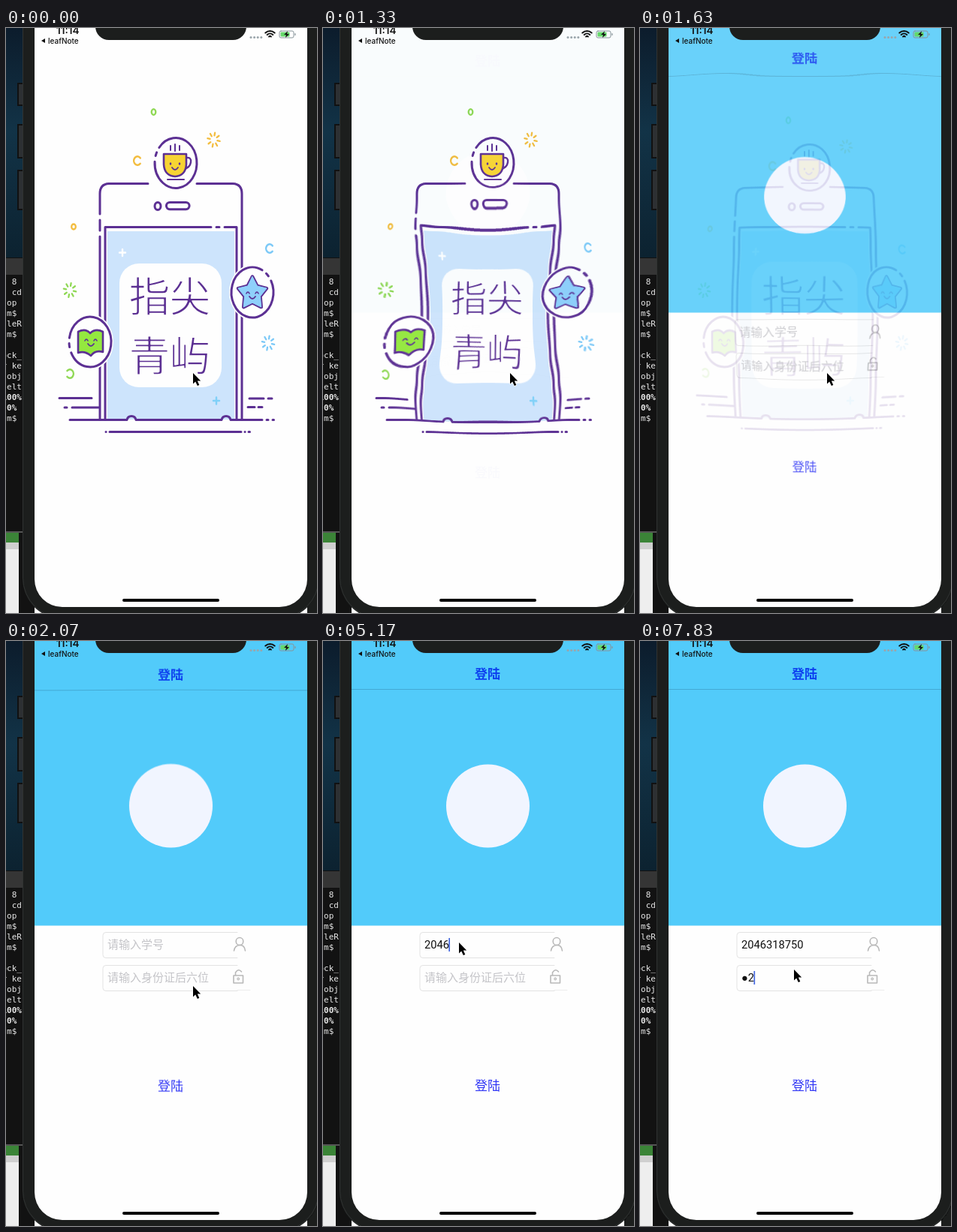
Write an HTML page with a canvas that moves like this. It is 414 px wide and 780 px high and loops after 8 s.

```html
<!DOCTYPE html>
<html lang="zh">
<head>
<meta charset="utf-8">
<style>
html, body { margin: 0; width: 100%; height: 100%; overflow: hidden; background: #1c1e1d; }
canvas { display: block; }
</style>
</head>
<body>
<canvas id="stage" width="414" height="780"></canvas>
<script>
const LOOP = 8000, STEP = 147.7;
const LEFT = 38, WIDTH = 363, HEIGHT = 780, CX = 219, CY = 379;
const PURPLE = '#5c3093', BLUE = '#7cc9f7', GREEN = '#8fd854', GOLD = '#f3bd3f';
const CJK = '"Noto Sans CJK SC", "Noto Sans CJK", sans-serif';
const stage = document.getElementById('stage').getContext('2d', { willReadFrequently: true });
let g = stage;

function line(d, color = PURPLE, width = 3, fill) {
  const path = new Path2D(d);
  if (fill) { g.fillStyle = fill; g.fill(path); }
  g.strokeStyle = color;
  g.lineWidth = width;
  g.lineCap = g.lineJoin = 'round';
  if (width) g.stroke(path);
}

function rect(x, y, w, h, color, radius = 0) {
  g.fillStyle = color;
  g.beginPath();
  g.roundRect(x, y, w, h, radius);
  g.fill();
}

function oval(x, y, rx, ry, color, width, fill, from = 0, to = 7) {
  g.beginPath();
  g.ellipse(x, y, rx, ry, 0, from, Math.min(to, from + Math.PI * 2));
  if (fill) { g.fillStyle = fill; g.fill(); }
  g.strokeStyle = color;
  g.lineWidth = width;
  g.lineCap = 'round';
  if (width) g.stroke();
}

function text(str, x, y, font, color, align = 'left') {
  g.font = font;
  g.fillStyle = color;
  g.textAlign = align;
  g.fillText(str, x, y);
}

// Piecewise interpolation through [position, value] pairs.
function keyed(keys, x, ease = p => p) {
  if (x <= keys[0][0]) return keys[0][1];
  for (let i = 1; i < keys.length; i++) {
    const [x0, y0] = keys[i - 1], [x1, y1] = keys[i];
    if (x < x1) return y0 + (y1 - y0) * ease((x - x0) / (x1 - x0));
  }
  return keys.at(-1)[1];
}

function layer(paint) {
  const canvas = document.createElement('canvas');
  canvas.width = 414;
  canvas.height = HEIGHT;
  g = canvas.getContext('2d');
  paint();
  g = stage;
  return canvas;
}

function burst(x, y, color) {
  for (let i = 0; i < 8; i++) {
    const a = i * Math.PI / 4 + .2, c = Math.cos(a), s = Math.sin(a) * 1.15;
    line(`M${x + c * 5} ${y + s * 5}L${x + c * 8.3} ${y + s * 8.3}`, color, 2.3);
  }
}

function face(x, y, winks) {
  for (const dx of [-6, 6]) {
    if (winks) line(`M${x + dx - 2} ${y}q2 -4 4 0`, PURPLE, 1.6);
    else oval(x + dx, y - 1, 1.3, 1.8, PURPLE, 0, PURPLE);
  }
  line(`M${x - 4} ${y + 4}q4 6 8 0`, PURPLE, 1.8);
}

function badge(x, y, gap) {
  oval(x, y, 31, 37, '#fefefe', 0, '#fefefe');
  oval(x, y, 28, 33.5, PURPLE, 3, null, gap + .5, gap + 6.18);
  oval(x, y, 28, 33.5, PURPLE, 3, null, gap + .13, gap + .28);
}

// Hairline lettering: the fill is trimmed by an outline in the paper colour.
function thinText(char, x, y) {
  text(char, x, y, `200 55px ${CJK}`, PURPLE, 'center');
  g.strokeStyle = '#fefefe';
  g.lineWidth = 1.5;
  g.strokeText(char, x, y);
}

const welcome = layer(() => {
  rect(0, 0, 414, HEIGHT, '#fefefe');
  rect(135, 271, 169, 251, '#cde4fc');
  line('M125 522V278M125 270V256M125 248V221Q125 208 137 207.5H189M254 207.5H302Q314 208 314 221V522');
  line('M132 522V265.5H273M280 265.5H284M291 265.5H307V522');
  oval(202, 237.5, 4, 5, PURPLE, 3);
  line('M218 232.5H239.5a4.6 4.6 0 0 1 0 9.2H218a4.6 4.6 0 0 1 0 -9.2z');
  line('M85 522.5H161q1 -5 6 -5t6 5H287q1 -5 6 -5t6 5H341M347 522.5H349M355 522.5H356.5');
  line('M71 493.5H114M78 506H81M88 506H124M324 494H343M349 494H354M322 505.5H331M336 505.5H341');
  line('M133 538.5h.1M138 538.5H313M318 538.5h.1M323 538.5H324.5');
  rect(151, 314, 136, 165, '#fefefe', 26);
  [...'指尖青屿'].forEach((char, i) => thinText(char, 191 + i % 2 * 54, 378 + (i >> 1) * 79));

  badge(226, 180, 3.3);
  line('M240 173q7 -1 6 6t-9 9', PURPLE, 2.4);
  line('M210 168H240V182Q239 197 225 198Q211 197 210 182z', PURPLE, 2.6, '#f7d433');
  face(225, 182);
  line('M219 157v6M225 155v9M231 157v6M215 202H237', PURPLE, 2);

  badge(328, 352.5, 5.3);
  let star = '';
  for (let i = 0; i < 10; i++) {
    const a = i * Math.PI / 5 - Math.PI / 2, r = i % 2 ? 11 : 20;
    star += `${i ? 'L' : 'M'}${328 + Math.cos(a) * r} ${354 + Math.sin(a) * r * 1.12}`;
  }
  line(star + 'z', PURPLE, 4.5, PURPLE);
  line(star + 'z', '#8fd0fb', 1, '#8fd0fb');
  face(328, 354, true);

  badge(112, 418.5, 2.8);
  line('M96 405Q106 400 112 407Q119 400 129 405V432Q119 429 113 437Q105 430 96 433z', PURPLE, 2.6, '#94e83f');
  face(113, 417, true);

  oval(196.5, 112, 2.8, 3.8, GREEN, 2.3);
  oval(90, 265, 2.8, 3.5, GOLD, 2.3);
  oval(175, 177, 4.8, 5.8, GOLD, 2.5, null, .7, 5.6);
  oval(351, 294, 4.8, 5.8, BLUE, 2.5, null, .7, 5.6);
  oval(85, 461, 4.8, 5.8, GREEN, 2.5, null, -2.4, 2.4);
  burst(276.5, 149, GOLD);
  burst(85, 349.5, GREEN);
  burst(349, 420, BLUE);
  line('M151 299.5h8M155 295v9', '#fff', 2.4);
  line('M276 497h8M280 492.5v9', '#7fd0f8', 2.4);
});

const login = layer(() => {
  rect(0, 0, 414, HEIGHT, '#fefefe');
  rect(0, 0, 414, 379.5, '#52cbfa');
  rect(0, 64, 414, 1, '#43a9d3');
  text('登陆', CX, 50, `bold 17px ${CJK}`, '#0d40ef', 'center');
  oval(219.5, 220, 55.5, 55.5, '', 0, '#f1f5ff');
  for (const y of [388.5, 432.5])
    line(`M308 ${y}H133q-4 0 -4 4v26q0 4 4 4H308`, '#e3e3e3', 1);
  line('M308 465.5H325', '#ececec', 1);
  oval(311, 400.5, 4.8, 5, '#b9b9b9', 1.6);
  line('M303.5 413q1 -7 7.5 -7.5t7.5 7.5', '#b9b9b9', 1.6);
  line('M303 446H315.5V456H303zM305.5 446V442q4 -6 8 -1', '#b9b9b9', 1.6);
  oval(309.2, 450.5, 1.3, 1.3, '#b9b9b9', 1.2);
  text('登陆', CX, 599, `500 17px ${CJK}`, '#2f35f5', 'center');
});

const frame = layer(() => {
  const body = new Path2D();
  body.roundRect(22, -60, 395, 848, 54);
  body.roundRect(LEFT, -60, WIDTH, 832, 37);
  g.fillStyle = '#1c1e1d';
  g.fill(body, 'evenodd');
  g.strokeStyle = '#303332';
  g.lineWidth = 1;
  g.beginPath();
  g.roundRect(22.5, -60, 394, 847, 54);
  g.stroke();
  rect(119, -30, 201, 46, '#1c1e1d', 18);
  rect(155, 761, 129, 4, '#050505', 2);
  text('11:14', 67, 7.5, '600 13.5px Inter, sans-serif', '#111');
  line('M47 17L52 14V20z', '#111', 0, '#111');
  text('leafNote', 56, 20.5, '500 10px Inter, sans-serif', '#111');
  for (let i = 0; i < 4; i++) oval(326 + i * 4.6, 12.5, 1.5, 1.5, '', 0, '#9aa5ab');
  for (const r of [2, 5.5, 9]) oval(351.5, 13, r, r, '#111', 2, null, 3.95, 5.47);
  line('M366 4H381q2 0 2 2v5q0 2 -2 2H366q-2 0 -2 -2v-5q0 -2 2 -2z', '#87949a', 1);
  rect(365.5, 5.5, 12, 6, '#66d86b', 1);
  rect(384.3, 7, 1.3, 3, '#87949a', 1);
  line('M375 4L370 9H373L372 13L377 8H374z', '#111', 0, '#111');
});

const desktop = layer(() => {
  const sky = g.createLinearGradient(0, 0, 0, 306);
  sky.addColorStop(0, '#0c1c2c');
  sky.addColorStop(.45, '#123347');
  sky.addColorStop(1, '#0c2230');
  rect(0, 0, 60, 306, sky);
  for (const [y, h] of [[73, 31], [128, 46], [189, 54]]) {
    rect(15, y, 30, h, '#111');
    rect(17, y + 2, 28, h - 4, '#2d3033');
  }
  rect(0, 306, 60, HEIGHT, '#121212');
  rect(0, 307, 60, 22, '#353535');
  rect(0, 671, 60, 2, '#555');
  rect(0, 673, 17, 13, '#3b8437');
  rect(0, 686, 17, 94, '#eeeeee');
  rect(0, 686, 17, 9, '#cfcfcf');
  const lines = ['  8', 's cd', ' op', ' m$', ' leR', ' m$', '', 'ock_', 'r ke', ' obj', ' elt', '100%', ' 0%', ' m$'];
  lines.forEach((str, i) =>
    text(str, -5.6, 342 + i * 14, `${/%/.test(str) ? 'bold ' : ''}11px "DejaVu Sans Mono", monospace`, '#e8e8e8'));
});

const smooth = p => (1 - Math.cos(p * Math.PI)) / 2;
const FADE = [[1180, 0], [1330, .02], [1480, .15], [1630, .89], [1780, .98], [1930, 1]];
const FRONT = [[0, -60], [1330, 130], [1480, 188], [1630, 320], [1800, 470], [2700, 1200]];
const POWER = [[0, 0], [1330, .7], [1480, 1], [2000, .8], [2750, .2]];
// Outward shift by distance from the wave front.
const WAVE = [[-560, 0], [-430, 1], [-330, -2], [-230, 3], [-190, 0], [-110, -8], [-60, -12], [-30, -8], [0, 0], [20, 4.5], [50, 0]];

function ripple(time) {
  const front = keyed(FRONT, time), power = keyed(POWER, time);
  const shift = Array.from({ length: 470 }, (_, r) =>
    power * Math.min(1, r / 60) * keyed(WAVE, r - front, smooth));
  const source = stage.getImageData(LEFT, 0, WIDTH, HEIGHT), from = source.data;
  const result = stage.createImageData(WIDTH, HEIGHT), to = result.data;
  const clamp = (v, max) => Math.max(0, Math.min(max - 1.001, v));
  for (let y = 0, i = 0; y < HEIGHT; y++) {
    for (let x = 0; x < WIDTH; x++, i += 4) {
      const dx = x + LEFT - CX, dy = y - CY, r = Math.hypot(dx, dy) || 1;
      const k = shift[Math.round(r)] / r;
      const sx = clamp(x - dx * k, WIDTH), sy = clamp(y - dy * k, HEIGHT);
      const ix = sx | 0, iy = sy | 0, fx = sx - ix, fy = sy - iy;
      const p = (iy * WIDTH + ix) * 4, q = p + WIDTH * 4;
      for (let c = 0; c < 3; c++)
        to[i + c] = (from[p + c] * (1 - fx) + from[p + c + 4] * fx) * (1 - fy)
                  + (from[q + c] * (1 - fx) + from[q + c + 4] * fx) * fy;
      to[i + 3] = 255;
    }
  }
  stage.putImageData(result, LEFT, 0);
}

// Ticks at which each further character shows.
const ID_TICKS = [30, 32, 33, 35, 38, 39, 40, 41, 44, 44];
const CURSOR_X = [[19, 249], [20, 222], [23, 222], [28, 181], [46, 181], [48, 206], [53, 205]];
const CURSOR_Y = [[19, 460], [20, 400], [23, 400], [28, 402], [46, 402], [48, 472], [51, 438]];

function field(value, hint, y, focused) {
  if (value) text(value, 135, y, '14.7px Roboto, sans-serif', '#111');
  else text(hint, 135, y, `15px ${CJK}`, '#c4c4c8');
  if (!focused) return;
  g.font = '14.7px Roboto, sans-serif';
  rect(135 + (value ? g.measureText(value).width - .7 : 0), y - 14, 1.7, 18, '#4468df');
}

function fields(tick) {
  const id = '2046318750'.slice(0, ID_TICKS.filter(k => tick >= k).length);
  const pin = tick >= 53 ? '●2' : tick >= 52 ? '7' : '';
  field(id, '请输入学号', 410, tick >= 26 && tick < 50);
  field(pin, '请输入身份证后六位', 454, tick >= 50);
}

function cursor(tick) {
  const arrow = 'M0 0V14.5L3.2 11.6L5.8 17L8.3 15.9L5.8 10.6H10.2z';
  g.save();
  g.translate(keyed(CURSOR_X, tick), keyed(CURSOR_Y, tick));
  line(arrow, '#fff', 1.6);
  line(arrow, '', 0, '#000');
  g.restore();
}

function draw(tick) {
  const time = tick * STEP;
  stage.drawImage(desktop, 0, 0);
  stage.save();
  stage.beginPath();
  stage.rect(LEFT, 0, WIDTH, HEIGHT);
  stage.clip();
  stage.drawImage(welcome, 0, 0);
  stage.globalAlpha = keyed(FADE, time);
  stage.drawImage(login, 0, 0);
  fields(tick);
  stage.restore();
  if (tick > 0 && tick < 19) ripple(time);
  stage.drawImage(frame, 0, 0);
  cursor(tick);
}

let shown = -1;
function run() {
  const tick = Math.floor((performance.now() % LOOP + 5) / STEP);
  if (tick !== shown) draw(shown = tick);
  requestAnimationFrame(run);
}
run();
</script>
</body>
</html>
```
